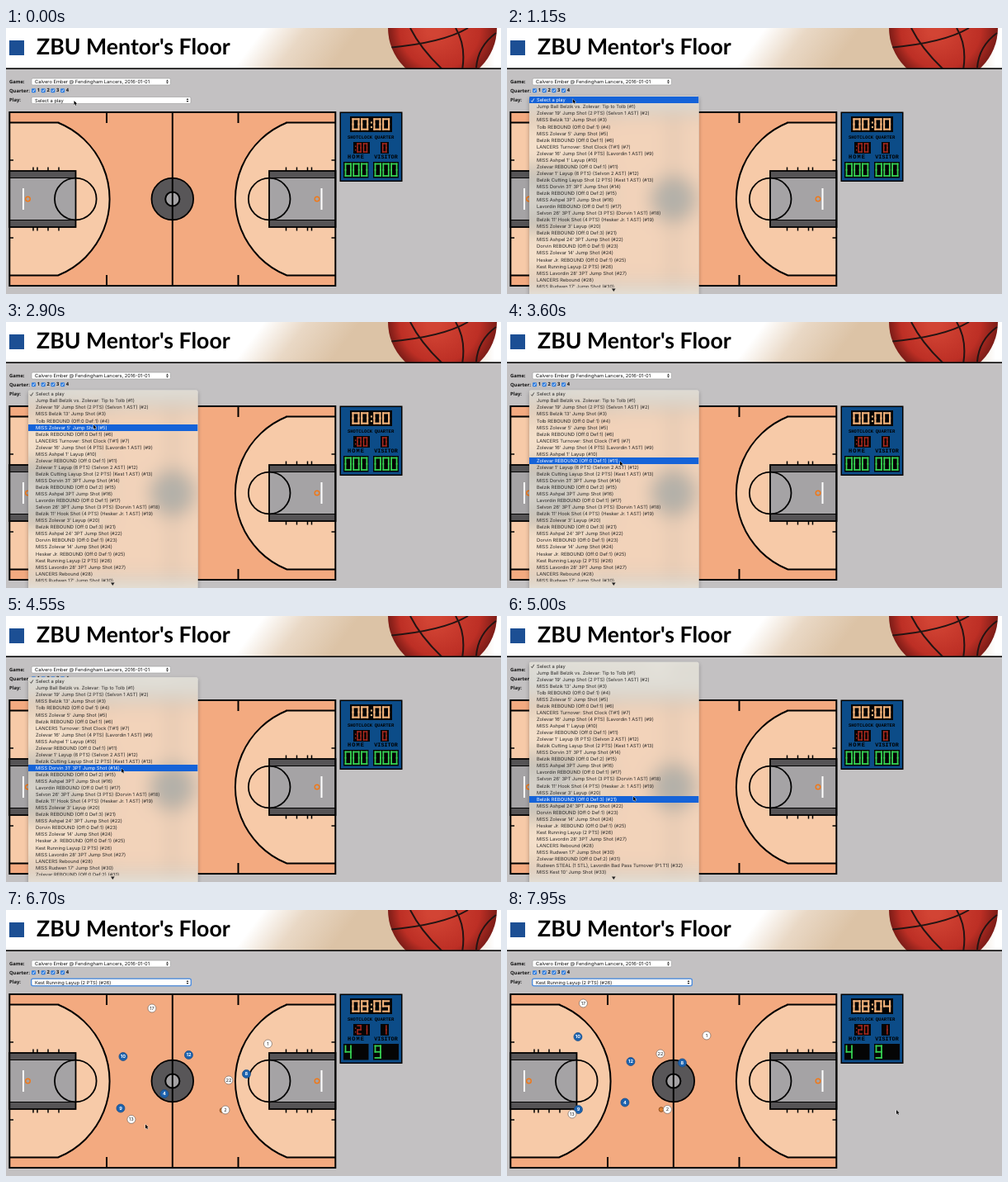
These frames come from a looping animation (600 by 322 pixels, 8 s). An HTML page with a canvas:

```html
<!DOCTYPE html>
<html lang="en">
<head>
<meta charset="utf-8">
<title>Court playback</title>
<style>
html, body { margin: 0; width: 100%; height: 100%; overflow: hidden; background: #c3c1c2; }
canvas { display: block; }
</style>
</head>
<body>
<canvas id="stage" width="600" height="322"></canvas>
<script>
const W = 600, H = 322, LOOP = 8000;
const UI = 'Inter, sans-serif';
const ctx = document.getElementById('stage').getContext('2d');

const OPEN = 450, SCROLL = 4400, CLICK = 5600, CLOSE = 5750, PLAY = 6100, TICK = 7150;
const ROW = 8.05, MENU = { x: 27, y: 83.4, w: 205.5 };
const CHOICE = 25;
const PLAYS = [
  'Select a play',
  'Jump Ball Belzik vs. Zolevar: Tip to Tolb (#1)',
  "Zolevar 19' Jump Shot (2 PTS) (Selvon 1 AST) (#2)",
  "MISS Belzik 13' Jump Shot (#3)",
  'Tolb REBOUND (Off:0 Def:1) (#4)',
  "MISS Zolevar 5' Jump Shot (#5)",
  'Belzik REBOUND (Off:0 Def:1) (#6)',
  'LANCERS Turnover: Shot Clock (T#1) (#7)',
  "Zolevar 16' Jump Shot (4 PTS) (Lavordin 1 AST) (#9)",
  "MISS Ashpel 1' Layup (#10)",
  'Zolevar REBOUND (Off:0 Def:1) (#11)',
  "Zolevar 1' Layup (6 PTS) (Selvon 2 AST) (#12)",
  'Belzik Cutting Layup Shot (2 PTS) (Kest 1 AST) (#13)',
  "MISS Dorvin 31' 3PT Jump Shot (#14)",
  'Belzik REBOUND (Off:0 Def:2) (#15)',
  'MISS Ashpel 3PT Jump Shot (#16)',
  'Lavordin REBOUND (Off:0 Def:1) (#17)',
  "Selvon 26' 3PT Jump Shot (3 PTS) (Dorvin 1 AST) (#18)",
  "Belzik 11' Hook Shot (4 PTS) (Hesker Jr. 1 AST) (#19)",
  "MISS Zolevar 3' Layup (#20)",
  'Belzik REBOUND (Off:0 Def:3) (#21)',
  "MISS Ashpel 24' 3PT Jump Shot (#22)",
  'Dorvin REBOUND (Off:0 Def:1) (#23)',
  "MISS Zolevar 14' Jump Shot (#24)",
  'Hesker Jr. REBOUND (Off:0 Def:1) (#25)',
  'Kest Running Layup (2 PTS) (#26)',
  "MISS Lavordin 28' 3PT Jump Shot (#27)",
  'LANCERS Rebound (#28)',
  "MISS Rudwen 17' Jump Shot (#30)",
  'Zolevar REBOUND (Off:0 Def:2) (#31)',
  'Rudwen STEAL (1 STL), Lavordin Bad Pass Turnover (P1.T1) (#32)',
  "MISS Kest 10' Jump Shot (#33)",
  'Zolevar REBOUND (Off:0 Def:3) (#34)',
];

// Keyframes: [time, ...values]
const CURSOR = [[0, 82.5, 88], [500, 80, 86], [2400, 79, 85.5], [3450, 137, 168.5], [3700, 137, 168.5],
  [4450, 140, 184.5], [4650, 140, 184.5], [5400, 169, 259.5], [6800, 169, 259.5], [7850, 472, 242]];
const SCROLLING = [[SCROLL, 0], [4550, 8.05], [5150, 30.1]];

// number, home side (white), position at 6700 ms and at 7950 ms
const PLAYERS = [
  [17, 1, 177, 119, 92.5, 113], [10, 0, 142, 177.5, 86, 153.5], [12, 0, 221.5, 175.5, 150, 183.5],
  [1, 1, 317.5, 162, 242, 152], [22, 1, 270, 206, 186, 174], [8, 0, 291.5, 198.5, 212.5, 185],
  [4, 0, 192, 222.5, 143, 233], [2, 1, 266, 242, 194.5, 241.5], [9, 0, 139, 240, 86.5, 241.5],
  [13, 1, 152, 253.5, 79, 247],
];
const BALL = [262, 242.5, 187, 241.5];

const SEGMENT_LINES = { a: [0, 0, 1, 0], b: [1, 0, 1, .5], c: [1, .5, 1, 1], d: [0, 1, 1, 1],
  e: [0, .5, 0, 1], f: [0, 0, 0, .5], g: [0, .5, 1, .5] };
const DIGITS = { 0: 'abcdef', 1: 'bc', 2: 'abged', 4: 'fgbc', 5: 'afgcd', 8: 'abcdefg', 9: 'abcdfg' };

const mix = (a, b, u) => a + (b - a) * u;
const clamp = u => Math.min(1, Math.max(0, u));
const smooth = u => u * u * (3 - 2 * u);

function sample(keys, t) {
  if (t <= keys[0][0]) return keys[0].slice(1);
  for (let i = 1; i < keys.length; i++) {
    const [a, b] = [keys[i - 1], keys[i]];
    if (t < b[0]) {
      const u = smooth((t - a[0]) / (b[0] - a[0]));
      return a.slice(1).map((v, k) => mix(v, b[k + 1], u));
    }
  }
  return keys[keys.length - 1].slice(1);
}

function text(g, str, x, y, font, color = '#111', align = 'left') {
  g.textRendering = 'geometricPrecision';
  g.font = font;
  g.fillStyle = color;
  g.textAlign = align;
  g.textBaseline = 'middle';
  g.fillText(str, x, y);
}

function rect(g, x, y, w, h, fill) {
  g.fillStyle = fill;
  g.fillRect(x, y, w, h);
}

function roundRect(g, x, y, w, h, r, fill, stroke, width = .6) {
  g.beginPath();
  g.roundRect(x, y, w, h, r);
  if (fill) { g.fillStyle = fill; g.fill(); }
  if (stroke) { g.strokeStyle = stroke; g.lineWidth = width; g.stroke(); }
}

function circle(g, x, y, r, fill, stroke, width = 2) {
  g.beginPath();
  g.arc(x, y, r, 0, 2 * Math.PI);
  if (fill) { g.fillStyle = fill; g.fill(); }
  if (stroke) { g.strokeStyle = stroke; g.lineWidth = width; g.stroke(); }
}

function line(g, x1, y1, x2, y2, color = '#000', width = 2) {
  g.strokeStyle = color;
  g.lineWidth = width;
  g.beginPath();
  g.moveTo(x1, y1);
  g.lineTo(x2, y2);
  g.stroke();
}

function drawHeader(g) {
  rect(g, 0, 0, W, 49, '#fff');
  const wood = g.createLinearGradient(276, 49, 350, 105);
  wood.addColorStop(0, '#fff');
  wood.addColorStop(.45, '#e9d8c5');
  wood.addColorStop(1, '#dcc3a6');
  rect(g, 270, 0, 322, 49, wood);
  const glow = g.createLinearGradient(540, 0, 592, 0);
  glow.addColorStop(0, 'rgba(255,255,255,0)');
  glow.addColorStop(1, '#fff');
  rect(g, 540, 0, 60, 49, glow);

  g.save();
  g.beginPath();
  g.rect(0, 0, W, 49);
  g.clip();
  const skin = g.createRadialGradient(518, 2, 8, 529, 0, 66);
  skin.addColorStop(0, '#d24434');
  skin.addColorStop(.7, '#bd2f25');
  skin.addColorStop(1, '#7c1c17');
  circle(g, 529, 0, 66, skin);
  g.clip();
  g.strokeStyle = '#231413';
  g.lineWidth = 2;
  g.stroke(new Path2D('M463 24Q530 18 560 0 M490 0Q505 30 540 60 M545 0Q560 25 551 60 M594 6Q572 22 570 48'));
  g.restore();

  rect(g, 0, 48.3, W, 1.7, '#111');
  rect(g, 4, 15, 18, 18, '#1c4f94');
  text(g, "ZBU Mentor's Floor", 37, 24, '700 26.7px Lato, sans-serif', '#000');
}

function drawSelect(g, y, w, label) {
  roundRect(g, 31, y - 4, w, 8, 1.6, '#fff', '#999');
  text(g, label, 35, y + .3, '5.75px ' + UI);
  const x = 31 + w - 4;
  g.fillStyle = '#222';
  g.fill(new Path2D(`M${x - 1.4} ${y - .6}h2.8l-1.4 -2z M${x - 1.4} ${y + .6}h2.8l-1.4 2z`));
}

function drawForm(g) {
  const bold = '700 5.8px "Open Sans", sans-serif';
  text(g, 'Game:', 4, 65, bold);
  text(g, 'Quarter:', 4, 76, bold);
  text(g, 'Play:', 4, 87.5, bold);
  drawSelect(g, 65, 168.5, 'Calvero Ember @ Fendingham Lancers, 2016-01-01');
  for (let i = 0; i < 4; i++) {
    const x = 31 + i * 11.7;
    roundRect(g, x, 73.2, 5, 5, 1, '#2f7de0');
    g.strokeStyle = '#fff';
    g.lineWidth = .8;
    g.stroke(new Path2D(`M${x + 1.1} 75.8l1.1 1.2l1.7 -2.7`));
    text(g, i + 1, x + 6.7, 75.9, bold);
  }
}

function drawHalfCourt(g) {
  g.beginPath();
  g.moveTo(4, 114.5);
  g.lineTo(63, 114.5);
  const angle = Math.atan2(92.5, 37);
  g.arc(26, 207, 99.6, -angle, angle);
  g.lineTo(4, 299.5);
  g.fillStyle = '#f7caa8';
  g.fill();
  g.strokeStyle = '#000';
  g.lineWidth = 2;
  g.stroke();

  rect(g, 4, 173, 80.5, 68, '#565456');
  rect(g, 4, 181.5, 80.5, 51, '#a5a3a5');
  g.lineWidth = 1.8;
  g.strokeRect(4, 173, 80.5, 68);
  line(g, 4, 181.5, 84, 181.5, '#000', 1);
  line(g, 4, 232.5, 84, 232.5, '#000', 1);
  circle(g, 84.3, 207, 25.3, null, '#000', 1.8);
  for (const x of [33, 38, 51, 64]) {
    line(g, x, 168.5, x, 173, '#000', 1.5);
    line(g, x, 241, x, 245.5, '#000', 1.5);
  }
  for (const y of [160, 254]) line(g, 4, y, 9, y, '#000', 1.5);
  line(g, 122, 102, 122, 115);
  line(g, 122, 299, 122, 312);
  line(g, 21, 194, 21, 220, '#fff', 2);
  circle(g, 26.5, 207, 2.8, null, '#f07818', 1.4);
}

function drawCourt(g) {
  rect(g, 4, 102, 395.5, 210, '#f3aa80');
  drawHalfCourt(g);
  g.save();
  g.translate(403.5, 0);
  g.scale(-1, 1);
  drawHalfCourt(g);
  g.restore();
  circle(g, 201.8, 207, 25.3, '#585658', '#000', 1.8);
  circle(g, 201.8, 207, 8.6, '#a5a3a5', '#000', 2);
  line(g, 201.8, 102, 201.8, 312);
  g.strokeStyle = '#000';
  g.strokeRect(4.3, 102, 395, 210);
}

function drawBoard(g) {
  rect(g, 404.5, 101.5, 76, 84.5, '#000');
  rect(g, 406, 103, 73, 81.5, '#0c4c88');
  for (const [x, y, w, h] of [[417, 107, 51, 19], [421, 138, 20, 14], [454, 138, 10, 14],
    [409, 162, 30.5, 19.5], [445, 162, 31, 19.5]]) rect(g, x, y, w, h, '#050505');
  const mono = 'px "Liberation Mono", monospace';
  text(g, 'SHOTCLOCK', 429, 133, '700 5.6' + mono, '#000', 'center');
  text(g, 'QUARTER', 458.5, 133, '700 5.6' + mono, '#000', 'center');
  g.letterSpacing = '1px';
  text(g, 'HOME', 424.5, 156.7, '700 7' + mono, '#000', 'center');
  g.letterSpacing = '0px';
  text(g, 'VISITOR', 460.5, 156.7, '700 6.8' + mono, '#000', 'center');
}

function drawLed(str, x, y, w, h, pitch, color, width) {
  ctx.lineCap = 'square';
  for (const ch of str) {
    if (ch === ':') {
      rect(ctx, x, y + h * .25, width, width, color);
      rect(ctx, x, y + h * .7, width, width, color);
      x += pitch * .42;
      continue;
    }
    for (const s of DIGITS[ch]) {
      const [x1, y1, x2, y2] = SEGMENT_LINES[s];
      line(ctx, x + x1 * w, y + y1 * h, x + x2 * w, y + y2 * h, color, width);
    }
    x += pitch;
  }
  ctx.lineCap = 'butt';
}

function drawScores(t) {
  const playing = t >= PLAY, late = t >= TICK;
  const [clock, shot, quarter, home, visitor] = playing
    ? [late ? '08:04' : '08:05', late ? ':20' : ':21', '1', '4', '9']
    : ['00:00', ':00', '0', '000', '000'];
  drawLed(clock, 420.5, 110.3, 7, 12.4, 10.7, '#f2b27a', 2.1);
  drawLed(shot, 423, 140, 4, 10, 7.4, '#b02a20', 1.4);
  drawLed(quarter, 456.7, 140, 4.2, 10, 8, '#b02a20', 1.4);
  drawLed(home, 411.5, 164.5, 6.5, 14.5, 9.7, '#35d052', 1.8);
  drawLed(visitor, 447.5, 164.5, 6.5, 14.5, 9.8, '#35d052', 1.8);
}

function drawPlayers(t) {
  const u = (t - 6700) / 1250;
  circle(ctx, mix(BALL[0], BALL[2], u), mix(BALL[1], BALL[3], u), 2.8, '#e08030', '#6b3a14', .7);
  for (const [number, home, x1, y1, x2, y2] of PLAYERS) {
    const x = mix(x1, x2, u), y = mix(y1, y2, u);
    circle(ctx, x, y, 5, home ? '#fff' : '#1c62ae', home ? '#77665c' : '#174a80', .7);
    text(ctx, number, x, y + .3, (home ? '400' : '700') + ' 5.6px ' + UI, home ? '#222' : '#fff', 'center');
  }
}

function drawMenu(t, cursorY) {
  const top = MENU.y - sample(SCROLLING, t)[0];
  const hovered = Math.floor((cursorY + .5 - top) / ROW);
  const blinkOff = t >= CLICK && t < CLICK + 80;
  ctx.save();
  ctx.globalAlpha = 1 - clamp((t - CLOSE) / 150);
  ctx.shadowColor = 'rgba(0,0,0,.3)';
  ctx.shadowBlur = 5;
  ctx.shadowOffsetY = 2;
  roundRect(ctx, MENU.x, top - 1, MENU.w, H - top + 10, 2, '#ddd');
  ctx.shadowColor = 'transparent';
  ctx.clip();
  ctx.drawImage(backdrop, 0, 0);

  ctx.save();
  ctx.beginPath();
  ctx.rect(0, 0, W, 314.3);
  ctx.clip();
  PLAYS.forEach((play, i) => {
    const y = top + i * ROW, active = i === hovered && !blinkOff;
    if (active) rect(ctx, MENU.x, Math.round(y), MENU.w, 8, '#1563d8');
    const color = active ? '#fff' : '#2a2827';
    text(ctx, play, 36, y + 4.2, '5.75px ' + UI, color);
    if (!i) {
      ctx.strokeStyle = color;
      ctx.lineWidth = .8;
      ctx.stroke(new Path2D(`M29.3 ${y + 4.4}l1.2 1.6l2.3 -3.9`));
    }
  });
  ctx.restore();
  ctx.fillStyle = '#222';
  ctx.fill(new Path2D('M127 315.6h4.6l-2.3 3.4z'));
  ctx.restore();
}

function drawCursor(x, y) {
  const arrow = new Path2D('M0 0V5.2L1.2 4.1L2 6L2.9 5.6L2.1 3.8H3.7Z');
  ctx.save();
  ctx.translate(x, y);
  ctx.strokeStyle = '#fff';
  ctx.lineWidth = .8;
  ctx.stroke(arrow);
  ctx.fillStyle = '#000';
  ctx.fill(arrow);
  ctx.restore();
}

function layer(paint) {
  const canvas = document.createElement('canvas');
  canvas.width = W;
  canvas.height = H;
  paint(canvas.getContext('2d'));
  return canvas;
}

const page = layer(g => {
  rect(g, 0, 0, W, H, '#c3c1c2');
  drawHeader(g);
  drawForm(g);
  drawCourt(g);
  drawBoard(g);
});

// Frosted view of the page behind the open menu
const backdrop = layer(g => {
  g.filter = 'blur(11px)';
  g.drawImage(page, 0, 0);
  g.filter = 'none';
  rect(g, 0, 0, W, H, 'rgba(242,238,226,.6)');
});

function frame(now) {
  const t = now % LOOP;
  const [x, y] = sample(CURSOR, t);
  ctx.drawImage(page, 0, 0);
  drawSelect(ctx, 87.5, 193, PLAYS[t < CLOSE ? 0 : CHOICE]);
  if (t >= CLOSE) roundRect(ctx, 30.6, 83.2, 193.8, 8.6, 2, null, '#4b8fe6', 1.2);
  drawScores(t);
  if (t >= PLAY) drawPlayers(t);
  if (t >= OPEN && t < CLOSE + 150) drawMenu(t, y);
  drawCursor(x, y);
  requestAnimationFrame(() => frame(performance.now() - start));
}

const start = performance.now();
frame(0);
</script>
</body>
</html>
```
